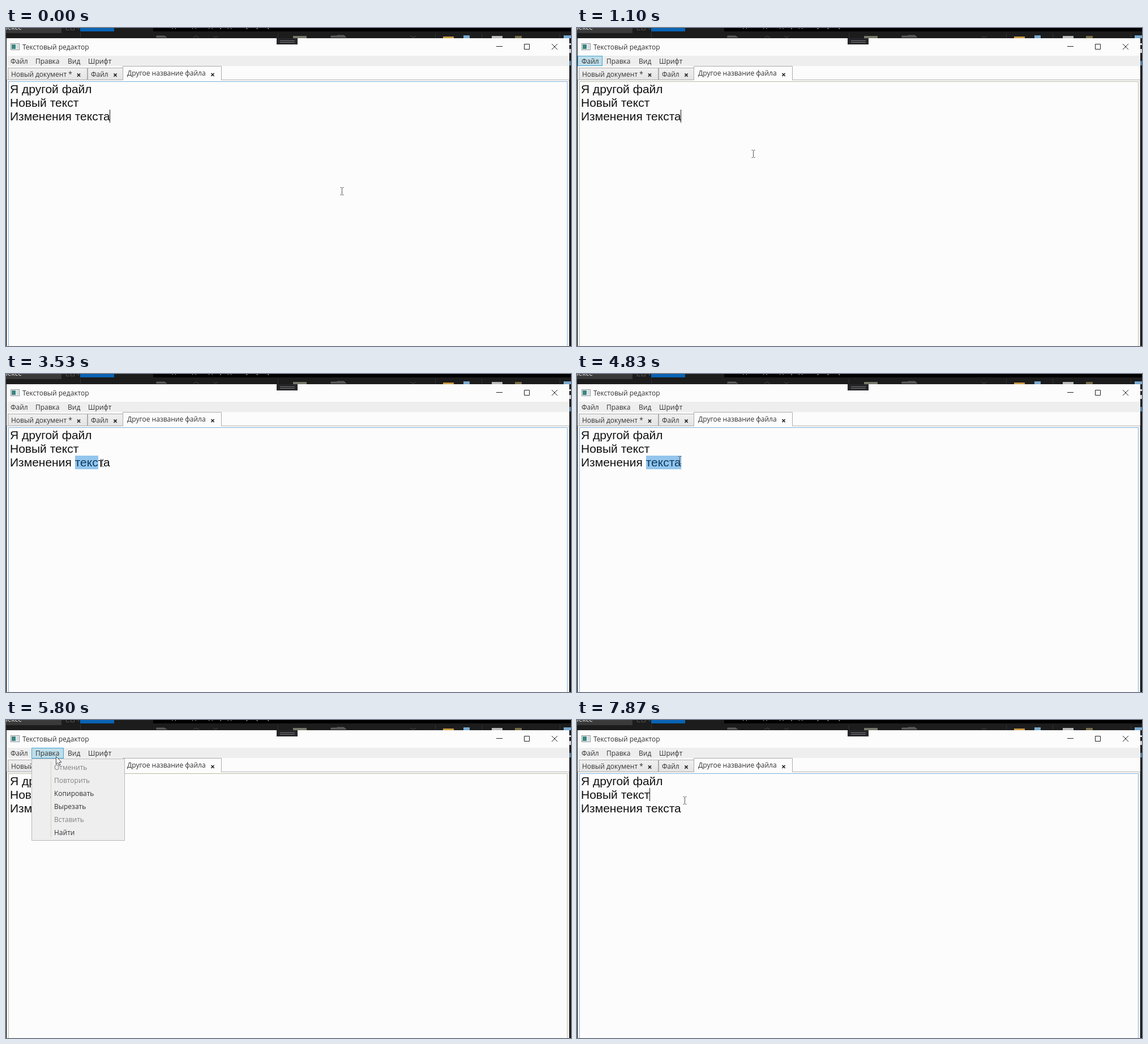
Animation of 998x561 px, one loop 8 s. Source, as an HTML page:

```html
<!DOCTYPE html>
<html lang="ru">
<head>
<meta charset="utf-8">
<style>
html, body { margin: 0; width: 100%; height: 100%; overflow: hidden; background: #1c1c1c; }
svg { display: block; width: 100vw; height: 100vh; }
text { white-space: pre; }
.ui { font: 12px "Open Sans", "Noto Sans", sans-serif; fill: #333; }
.doc { font: 21px "Liberation Sans", Arial, sans-serif; fill: #111; }
.hot { fill: #bedde9; stroke: #45a6d2; }
</style>
</head>
<body>
<svg id="stage" viewBox="0 0 998 561" preserveAspectRatio="none">
  <defs>
    <linearGradient id="tab" x2="0" y2="1">
      <stop offset="0" stop-color="#f0f0f0"/><stop offset="1" stop-color="#e4e4e4"/>
    </linearGradient>
  </defs>
  <g id="desk"></g>
  <g id="win"></g>
  <rect id="box" x="4.5" y="94.5" width="987" height="480" fill="none"/>
  <g id="page"></g>
  <rect id="sel" x="122" y="144" height="24" fill="#0078d7" opacity=".42"/>
  <rect id="caret" width="1" height="23" fill="#111"/>
  <g id="menu"></g>
  <path id="beam" d="M-3-6.5H-1L0-5.5L1-6.5H3M0-5.5V5.5M-3 6.5H-1L0 5.5L1 6.5H3" fill="none" stroke="#555"/>
  <path id="arrow" d="M.5.5V14L3.6 11.2L5.8 16L8 15L5.9 10.3H10Z" fill="#fff" stroke="#333" stroke-width=".9"/>
</svg>
<script>
const $ = id => document.getElementById(id);
const rect = (x, y, w, h, fill, more = '') =>
  `<rect x="${x}" y="${y}" width="${w}" height="${h}" fill="${fill}" ${more}/>`;
const path = (d, stroke, width = 1, fill = 'none') =>
  `<path d="${d}" stroke="${stroke}" stroke-width="${width}" fill="${fill}"/>`;
const label = (x, y, s, cls = 'ui', more = '') => `<text x="${x}" y="${y}" class="${cls}" ${more}>${s}</text>`;
const cross = (x, y, r, width) =>
  path(`M${x - r} ${y - r}l${2 * r} ${2 * r}M${x + r} ${y - r}l${-2 * r} ${2 * r}`, '#222', width);

// Strip of the desktop behind the window
$('desk').innerHTML =
  rect(0, 0, 998, 561, '#1c1c1c') +
  rect(0, 0, 98, 9, '#3a3a3a') + label(-4, 3, 'лексе', 'ui', 'style="fill:#eee"') +
  path('M106.5 0V3.5H112M114.5 0V3.5H120.5V0M128 0V3', '#555') +
  path('M131.5 7V17M480.5 9V17M758.5 9V17M840.5 9V17M978.5 9V17', '#333') +
  rect(131, 0, 60, 6, '#0a63b5') + rect(260, 0, 738, 6, '#000') +
  label(286, -1, 'од     кода     д    редактор програм     в', 'ui', 'style="fill:#ddd"') +
  path('M266 17V14H280L284 17M574 17V14H585V13H597L601 17', '#666', 1, '#555') +
  path('M331 17L336 14L341 17M366 14L370 17L374 14M714 14L719 17L724 14', '#474750') +
  rect(507, 14, 24, 4, '#77776a') + rect(772, 15, 19, 3, '#c99a42') +
  rect(808, 13, 11, 5, '#79a9cf') + rect(858, 14, 19, 4, '#b9b9b9') +
  rect(899, 14, 12, 4, '#776f4b') + rect(985, 13, 13, 5, '#79a9cf') +
  rect(995, 27, 3, 3, '#ddd') + rect(995, 37, 3, 7, '#ccc') + rect(995, 58, 3, 8, '#557b9b');

const tab = (x, w, s, end) =>
  rect(x + .5, 70.5, w, 21, 'url(#tab)', 'stroke="#acacac"') + label(x + 6, 86, s) + cross(end, 83, 2.6, 1.5);

$('win').innerHTML =
  rect(1, 18, 994, 543, '#fcfcfc') +
  rect(8.5, 27.5, 15, 11, '#f4f6f6', 'stroke="#8a9299"') + rect(10, 29, 7, 8, '#3b8580') +
  rect(18, 29, 4, 8, '#d3dde0') +
  label(29, 38, 'Текстовый редактор') +
  path('M866 32.5H877M915.5 28.5H924.5V37.5H915.5Z', '#222') + cross(969, 33, 5, 1) +
  rect(478, 18, 37, 11, '#26262a') + path('M484 22.5H510M484 25.5H510', '#777') +
  rect(1, 49, 994, 18, '#eeeeee') +
  '<rect id="file" class="hot" x="1.5" y="49.5" width="43" height="17"/>' +
  '<rect id="edit" class="hot" x="45.5" y="49.5" width="56" height="18"/>' +
  label(8, 63, 'Файл') + label(52, 63, 'Правка') + label(109, 63, 'Вид') + label(145, 63, 'Шрифт') +
  path('M1.5 561V91.5H994.5V561', '#b4b4b4') +
  tab(3, 140, 'Новый документ *', 128.5) + tab(144, 62, 'Файл', 193) +
  path('M206.5 92V67.5H380.5V92', '#acacac', 1, '#fcfcfc') +
  label(214, 84, 'Другое название файла') + cross(365, 82.3, 2.6, 1.5);

$('page').innerHTML = ['Я другой файл', 'Новый текст', 'Изменения текста']
  .map((s, i) => label(7, 115 + 24 * i, s, 'doc')).join('');

$('menu').innerHTML =
  rect(45.5, 68.5, 164, 144, '#eeeeee', 'stroke="#b8b8b8"') +
  path('M79.5 73V207', '#d2d2c8') +
  '<rect id="item" class="hot" x="48.5" y="117.5" width="158" height="22"/>' +
  ['Отменить', 'Повторить', 'Копировать', 'Вырезать', 'Вставить', 'Найти'].map((s, i) =>
    label(85, 87.5 + 23 * i, s, 'ui', [0, 1, 4].includes(i) ? 'style="fill:#838383"' : '')).join('');

// Pointer stops: time, x, y
const stops = [
  [30, 593, 288], [630, 428, 264], [830, 370, 243], [1670, 131, 159],
  [2570, 131, 159], [2730, 122, 159], [2970, 122, 159], [3120, 116, 159], [3230, 121, 158],
  [3530, 169, 157], [3770, 175, 157], [4270, 186, 157],
  [4730, 186, 157], [5480, 86, 59], [5700, 86, 59], [6330, 114, 134],
  [6900, 114, 134], [7330, 190, 142]
];
// Right edges of the letters in the selected word
const edges = [122, 131.6, 143.3, 152.5, 163, 172.6, 184.3];

function pointer(t) {
  const i = stops.findIndex(s => s[0] > t);
  if (i === 0) return stops[0].slice(1);
  if (i < 0) return stops[stops.length - 1].slice(1);
  const [t0, x0, y0] = stops[i - 1], [t1, x1, y1] = stops[i];
  const k = (t - t0) / (t1 - t0);
  const e = t1 - t0 > 400 && t > 870 ? k * k * (3 - 2 * k) : k;
  return [x0 + (x1 - x0) * e, y0 + (y1 - y0) * e];
}

const show = (id, on) => $(id).setAttribute('display', on ? 'inline' : 'none');
const within = (t, a, b) => t >= a && t < b;

function caretAt(t) {
  if (t < 2100) return [183, 144];
  if (t < 2630) return [131, 144];
  return t >= 7560 ? [128, 120] : null;
}

function draw(t) {
  const [x, y] = pointer(t);
  const altMode = within(t, 300, 2100), open = within(t, 5600, 6870);
  const isArrow = within(t, 300, 870) || within(t, 4730, 6900) && (y < 94 || open);

  show('file', altMode);
  show('edit', within(t, 5400, 6870));
  show('menu', open);
  show('item', open && y > 112);
  $('box').setAttribute('stroke', altMode || within(t, 5570, 6870) ? '#b9bba6' : '#7fb0dd');

  const reach = t < 4270 ? edges.filter(e => e <= x).pop() || 122 : 184.3;
  show('sel', within(t, 3230, 7560));
  $('sel').setAttribute('width', reach - 122);

  const caret = caretAt(t);
  show('caret', caret);
  if (caret) {
    $('caret').setAttribute('x', caret[0]);
    $('caret').setAttribute('y', caret[1]);
  }

  show('arrow', isArrow);
  show('beam', !isArrow);
  const px = Math.round(x), py = Math.round(y);
  $('arrow').setAttribute('transform', `translate(${px} ${py})`);
  $('beam').setAttribute('transform', `translate(${px + .5} ${py})`);
}

function loop() {
  draw(performance.now() % 8000);
  requestAnimationFrame(loop);
}
loop();
</script>
</body>
</html>
```
